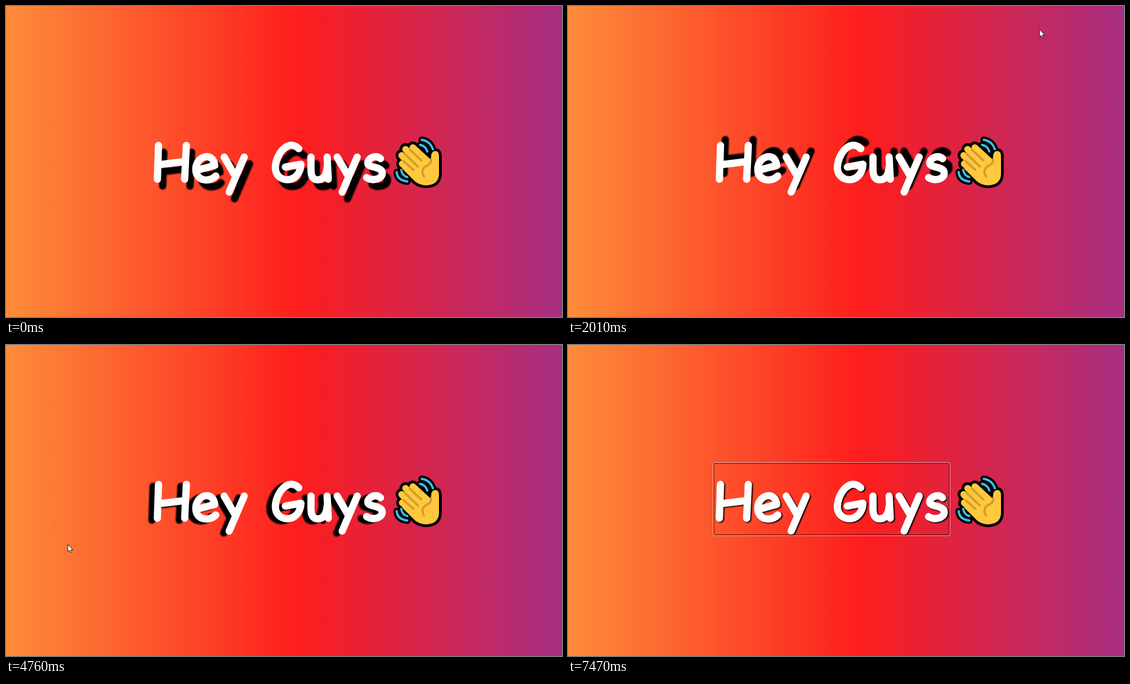
Recreate the animation shown at these times as an HTML page. Size 999 px wide and 560 px high, loop 8 s.

```html
<!DOCTYPE html>
<html lang="en">
<head>
<meta charset="utf-8">
<title>Hey Guys</title>
<style>
  html, body { margin: 0; width: 100%; height: 100%; overflow: hidden; }
  body { background: linear-gradient(to right, #fd8c3b, #fd1d1d 53%, #a72f83); }
  svg { display: block; width: 100%; height: 100%; fill: none; stroke-linecap: round; stroke-linejoin: round; }
  text { font: bold 92px "Comic Sans MS", cursive; }
  #shadow { stroke: #000; filter: blur(.8px); }
</style>
</head>
<body>
<svg viewBox="0 0 999 560" preserveAspectRatio="none">
  <defs>
    <g id="letters" stroke-width="13">
      <path id="H" d="M274 251L272 312M324 251L321 312M273 286L322 280"/>
      <path id="e" d="M346 295L375 287C372 261 341 270 341 294C341 316 366 318 377 306"/>
      <path id="y" d="M392 272L410 303M428 272L401 335"/>
      <path id="G" d="M526 257C505 237 484 270 484 291C484 320 528 322 530 285L502 290"/>
      <path id="u" d="M548 272V295Q548 313 560 313Q575 313 577 290M577 272L579 312"/>
      <use href="#y" x="203"/>
      <path id="s" d="M673 275C664 267 650 274 650 283C650 292 676 288 676 301C676 312 658 316 648 309"/>
    </g>
    <path id="fingers" d="M731 255L758 280M718 258L748 288M711 269L738 297M712 284L737 306"/>
    <path id="palm" d="M740 262L757 278Q764 279 764 269Q765 261 772 261Q778 262 778 270V303Q777 322 755 323Q744 323 735 316L712 293Z"/>
    <path id="waves" d="M747 241Q762 243 767 258M744 250Q754 252 757 262M702 299Q703 314 721 316M710 295Q712 306 721 308"/>
  </defs>

  <text x="262" y="318">Hey Guys</text>
  <use href="#letters" id="shadow"/>
  <use href="#letters" stroke="#fff"/>

  <g id="wavingHand">
    <g stroke="#000" fill="#000">
      <use href="#waves" fill="none" stroke-width="12"/>
      <use href="#fingers" stroke-width="22"/>
      <use href="#palm" stroke-width="10"/>
    </g>
    <use href="#waves" stroke="#38c0ea" stroke-width="4"/>
    <use href="#fingers" stroke="#ffc83d" stroke-width="12"/>
    <use href="#palm" fill="#ffc83d"/>
    <path d="M726 259L746 278M717 267L740 289M714 279L732 295M764 277Q764 284 757 287C748 291 746 299 751 307" stroke="#d59d2c" stroke-width="4"/>
  </g>

  <g id="focusRing">
    <rect x="261" y="212" width="425" height="131" rx="2" stroke="#fff"/>
    <rect x="262" y="213" width="423" height="129" rx="1" stroke="#000"/>
  </g>

  <path id="arrow" d="M.5.5V13.500L3.400 10.700 5.300 15 7.300 14.100 5.500 10H9.300Z" fill="#fff" stroke="#111" stroke-width=".9"/>
  <path id="beam" d="M-2-6H2M0-6V6M-2 6H2" stroke="#777"/>
</svg>

<script>
const LOOP = 8000, WALK = 25, ENTER = 210, FOCUS = 7210;
const [shadow, arrow, beam, ring] = ["shadow", "arrow", "beam", "focusRing"].map(id => document.getElementById(id));

// Turning points of the pointer: time, x, y.
const turns = [
  [200, 882, 556], [900, 390, 184], [1160, 486, 151], [1770, 792, 74],
  [2330, 882, 16], [2880, 806, 239], [3570, 848, 550], [3970, 714, 401],
  [4650, 108, 390], [5290, 158, 30], [5560, 181, 246], [5850, 330, 468],
  [6250, 747, 424], [FOCUS, 680, 281]
];

const slope = (i, axis) => (turns[i + 1][axis] - turns[i][axis]) / (turns[i + 1][0] - turns[i][0]);

// Speed at a turning point: zero where the direction flips, so the curve never overshoots.
function speed(i, axis) {
  if (i === 0 || i === turns.length - 1) return 0;
  const before = slope(i - 1, axis), after = slope(i, axis);
  return before * after > 0 ? 2 * before * after / (before + after) : 0;
}

function pointerAt(time) {
  const t = Math.min(Math.max(time, turns[0][0]), FOCUS);
  const i = Math.max(0, turns.findIndex(turn => turn[0] >= t) - 1);
  const span = turns[i + 1][0] - turns[i][0], u = (t - turns[i][0]) / span, v = 1 - u;
  return [1, 2].map(axis =>
    v * v * (1 + 2 * u) * turns[i][axis] + u * u * (1 + 2 * v) * turns[i + 1][axis] +
    u * v * span * (v * speed(i, axis) - u * speed(i + 1, axis)));
}

const place = (node, x, y) => node.setAttribute("transform", `translate(${x} ${y})`);
const show = (node, on) => node.setAttribute("visibility", on ? "visible" : "hidden");

function draw(time) {
  const focused = time >= FOCUS;
  const [x, y] = pointerAt(time);
  const overText = x > 261 && x < 686 && y > 212 && y < 343;

  // The shadow leans toward the pointer.
  const lean = focused ? [2, 1.5] : [(x / 999 - .5) * WALK, (y / 560 - .5) * WALK];
  place(shadow, ...lean);
  place(arrow, x, y);
  place(beam, x, y);
  show(arrow, time >= ENTER && !overText);
  show(beam, overText);
  show(ring, focused);
}

function frame() {
  draw(performance.now() % LOOP);
  requestAnimationFrame(frame);
}
frame();
</script>
</body>
</html>
```
